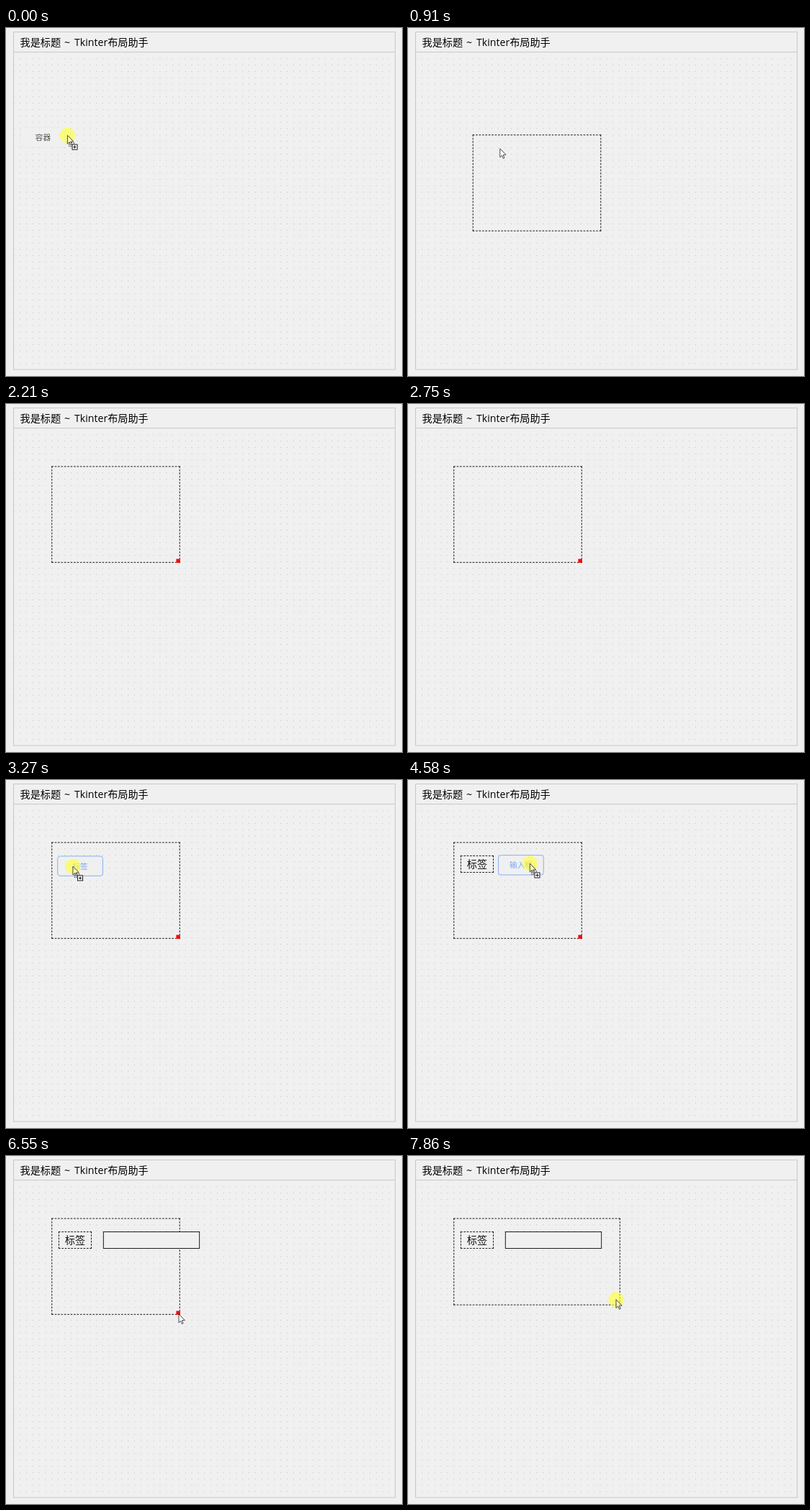
An HTML page with a canvas for the animation above (8000 ms loop, 550x484 px).

```html
<!DOCTYPE html>
<html lang="zh">
<head>
<meta charset="utf-8">
<style>
  html, body { margin: 0; overflow: hidden; background: #f0f0f0; }
  canvas { display: block; }
</style>
</head>
<body>
<canvas id="stage" width="550" height="484"></canvas>
<script>
const ctx = document.getElementById('stage').getContext('2d');
const LOOP = 8000, TICK = 130.8;
const SCALE = 530 / 600; // the form is 600 by 500 units with a 10 unit grid
const GRID = 10, GLIDE = 3;
const BG = '#f0f0f0', INK = '#111', BLUE = '#78a6f6';
const FONT = '"Open Sans", "Noto Sans CJK SC", "Noto Sans CJK", sans-serif';

// Pointer stops: tick at which the glide starts, then where it leads
const STOPS = [
  [0, 133, 152], [10, 103, 82], [14, -60, 120], [22, 93.5, 98], [29, -60, 60],
  [32, 180, 93.5], [38, 191, 91], [47, 260, 211], [51, 257, 207], [56, 315.5, 188]
];

// Tools dragged onto the form, held at the offset dx, dy from the pointer
const GHOSTS = [
  { from: 0, to: 4, text: '容器', dx: -74, dy: -12, border: '#e9e9ec', color: '#555' },
  { from: 19, to: 26, text: '标签', dx: -24, dy: -16, border: BLUE, color: BLUE },
  { from: 32, to: 41, text: '输入框', dx: -49.5, dy: -13, border: BLUE, color: BLUE }
];

const within = (n, a, b) => n >= a && n < b;
const glide = (n, start) => Math.max(0, Math.min(1, (n - start) / GLIDE));

function pointerAt(n) {
  let x = 85, y = 131;
  for (const [start, endX, endY] of STOPS) {
    const k = glide(n, start);
    x += (endX - x) * k;
    y += (endY - y) * k;
  }
  return { x, y };
}

function text(str, x, y, size, color, align = 'left') {
  ctx.font = `${size}px ${FONT}`;
  ctx.fillStyle = color;
  ctx.textAlign = align;
  ctx.fillText(str, x, y);
}

function fill(x, y, w, h, color) {
  ctx.fillStyle = color;
  ctx.fillRect(x, y, w, h);
}

function outline(x, y, w, h, color) {
  ctx.strokeStyle = color;
  ctx.strokeRect(x + 0.5, y + 0.5, w - 1, h - 1);
}

// Each side starts and ends with a full dash
function dashedSide(x1, y1, x2, y2) {
  const dash = 3, length = x2 - x1 + y2 - y1;
  const gap = (length - dash) / Math.round((length - dash) / 5) - dash;
  ctx.setLineDash([dash, gap]);
  ctx.beginPath();
  ctx.moveTo(x1, y1);
  ctx.lineTo(x2, y2);
  ctx.stroke();
  ctx.setLineDash([]);
}

function dashed(x, y, w, h) {
  ctx.strokeStyle = '#000';
  for (const e of [0.5, h - 0.5]) dashedSide(x, y + e, x + w, y + e);
  for (const e of [0.5, w - 0.5]) dashedSide(x + e, y, x + e, y + h);
}

function drawWindow() {
  fill(0, 0, 550, 484, BG);
  outline(10, 5, 531, 470.5, '#c8c8c8');
  outline(10, 33, 531, 1, '#c8c8c8');
  text('我是标题', 19.5, 25, 14.15, '#000');
  text('~', 81, 25, 14.15, '#000');
  text('Tkinter布局助手', 95, 25, 14.15, '#000');
}

function drawGrid() {
  for (let y = GRID; y < 500; y += GRID)
    for (let x = 0; x < 600; x += GRID) fill(x, y, 1, 1, '#b0b0b0');
}

function drawWidgets(n) {
  if (n < 4) return;
  const moved = glide(n, 10), sized = glide(n, 56);
  const x = 90 - 30 * moved, y = 130 - 70 * moved;
  const w = 202 + 60 * sized, h = 152 - 15 * sized;
  dashed(x, y, w, h);
  if (within(n, 13, 57)) fill(x + w - 6, y + h - 6, 6, 6, '#f00');
  if (n >= 26) {
    fill(71, 81, 52, 27, BG);
    dashed(71, 81, 52, 27);
    text('标签', 97, 100, 16, INK, 'center');
  }
  if (n >= 41) {
    fill(141, 81, 152, 27, BG);
    outline(141, 81, 152, 27, '#000');
  }
}

function drawGhost(g, p) {
  const x = p.x + g.dx, y = p.y + g.dy;
  ctx.beginPath();
  ctx.roundRect(x, y, 71, 31, 4);
  ctx.fillStyle = 'rgba(240,240,240,.8)';
  ctx.fill();
  ctx.strokeStyle = g.border;
  ctx.stroke();
  text(g.text, x + 35.5, y + 20, 12, g.color, 'center');
}

function drawPointer(p, pressed, dragging) {
  ctx.save();
  ctx.translate(p.x, p.y);
  if (pressed) {
    ctx.fillStyle = 'rgba(255,255,60,.65)';
    ctx.beginPath();
    ctx.arc(0, 0, 12, 0, Math.PI * 2);
    ctx.fill();
  }
  if (dragging) {
    ctx.setLineDash([2, 1]);
    outline(2, 11, 9, 7, '#333');
    ctx.setLineDash([]);
    fill(7, 14, 9, 9, '#fff');
    outline(7, 14, 9, 9, '#000');
    fill(9, 18, 5, 1, '#000');
    fill(11, 16, 1, 5, '#000');
  }
  ctx.fillStyle = pressed ? 'rgba(255,255,255,.4)' : '#fff';
  ctx.strokeStyle = '#333';
  ctx.beginPath();
  ctx.moveTo(0, 0);
  for (const [x, y] of [[0, 13.5], [3, 10.7], [5, 15.4], [7, 14.5], [5, 10], [9.3, 9.6]])
    ctx.lineTo(x, y);
  ctx.closePath();
  ctx.fill();
  ctx.stroke();
  ctx.restore();
}

function draw(time) {
  const n = Math.floor((time % LOOP + 16) / TICK);
  const p = pointerAt(n);
  const ghost = GHOSTS.find(g => within(n, g.from, g.to));
  const pressed = ghost || within(n, 10, 14) || n >= 54;
  drawWindow();
  ctx.save();
  ctx.translate(10.3, 33.5);
  ctx.scale(SCALE, SCALE);
  drawGrid();
  drawWidgets(n);
  if (ghost) drawGhost(ghost, p);
  drawPointer(p, pressed, ghost);
  ctx.restore();
}

const begin = performance.now();
function tick() {
  draw(performance.now() - begin);
  requestAnimationFrame(tick);
}
tick();
</script>
</body>
</html>
```
